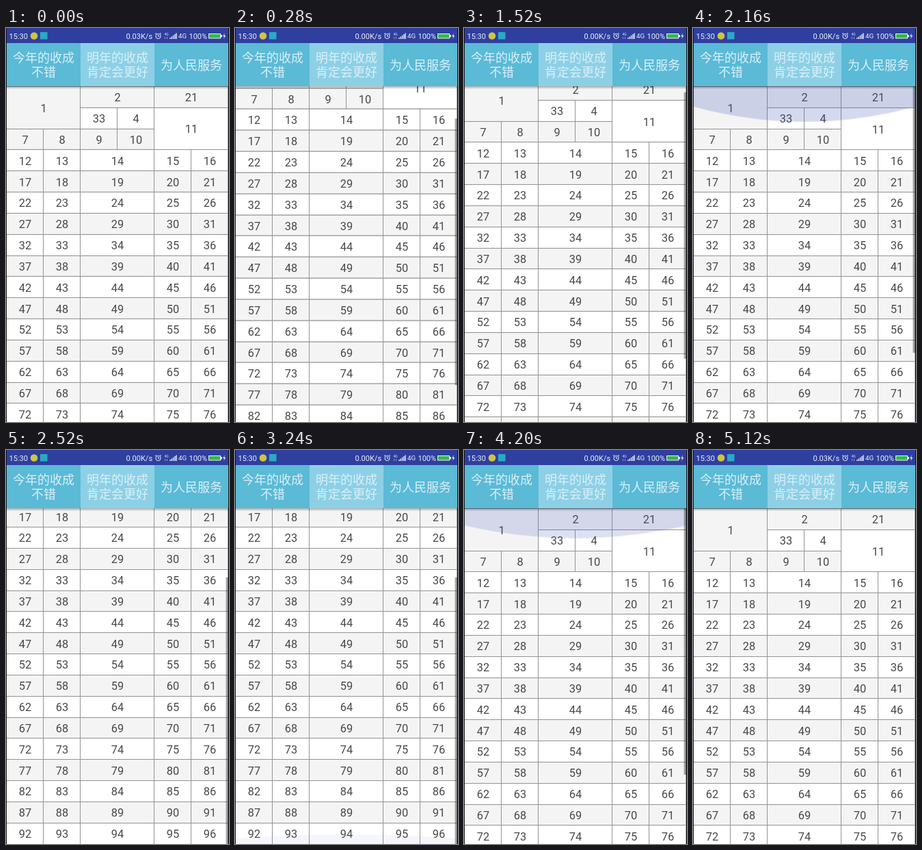
Animation of 326 by 575 pixels, one loop 5.16 s. Source, as an HTML page:

```html
<!DOCTYPE html>
<html lang="zh">
<head>
<meta charset="utf-8">
<title>Scrolling table</title>
<style>
@property --scroll { syntax: "<number>"; inherits: true; initial-value: 0; }
@property --grow { syntax: "<number>"; inherits: true; initial-value: 0; }

html, body { margin: 0; width: 100%; height: 100%; overflow: hidden; background: #fff; }
svg { display: block; width: 326px; height: 575px; font-family: Roboto, "Noto Sans", sans-serif; }

.list { animation: scroll 5160ms linear infinite; }
.rows { transform: translateY(calc(var(--scroll) * -1px)); }
.rows rect { stroke: #939393; }
.rows text { font-size: 16.4px; fill: #484848; text-anchor: middle; }
.thumb { fill: #000; transform: translateY(calc(var(--scroll) * .794px)); animation: thumb 5160ms linear infinite; }

.glow { fill: #3f51b5; opacity: 0; }
.top { transform: translate(163px, 85px) scale(1, var(--grow)); animation: top-glow 5160ms linear infinite; }
.bottom { transform: translate(163px, 575px) scale(1, calc(var(--grow) * -1)); animation: bottom-glow 5160ms linear infinite; }

.head text { font: 500 18px "Noto Sans CJK SC", "Noto Sans CJK", "Noto Sans CJK JP", sans-serif; fill: #d9f0f8; text-anchor: middle; }
.status text { font-size: 11px; fill: #eceefa; }
.busy { animation: busy 5160ms step-end infinite; }
.idle { animation: idle 5160ms step-end infinite; }

@keyframes scroll {
  0% { --scroll: 0; }
  .78% { --scroll: 3; }
  5.43% { --scroll: 59; animation-timing-function: ease-out; }
  10.08%, 23.1% { --scroll: 127; }
  24.03% { --scroll: 118; }
  27% { --scroll: 56; animation-timing-function: ease-out; }
  31% { --scroll: 0; }
  42.64% { --scroll: 0; animation-timing-function: cubic-bezier(.35, .1, .5, 1); }
  48.7%, 65.2% { --scroll: 127; }
  68.22% { --scroll: 50; animation-timing-function: ease-out; }
  73%, 100% { --scroll: 0; }
}
@keyframes thumb {
  0% { opacity: 0; }
  .78%, 88.5% { opacity: .35; }
  96.5%, 100% { opacity: 0; }
}
@keyframes bottom-glow {
  0%, 10% { opacity: 0; --grow: 0; }
  15% { opacity: .22; --grow: .85; }
  20% { opacity: .2; --grow: .8; }
  24.03% { opacity: .11; --grow: .6; }
  27.2%, 48.9% { opacity: 0; --grow: 0; }
  54% { opacity: .22; --grow: .85; }
  59% { opacity: .17; --grow: .7; }
  64.5%, 100% { opacity: 0; --grow: 0; }
}
@keyframes top-glow {
  0%, 30.5% { opacity: 0; --grow: 0; }
  36% { opacity: .22; --grow: .75; }
  41.86% { opacity: .22; --grow: .8; }
  46.5%, 72.8% { opacity: 0; --grow: 0; }
  77.5% { opacity: .22; --grow: .8; }
  82% { opacity: .17; --grow: .65; }
  88%, 100% { opacity: 0; --grow: 0; }
}
@keyframes busy {
  0% { opacity: 1; }
  3.9% { opacity: 0; }
  98.44%, 100% { opacity: 1; }
}
@keyframes idle {
  0% { opacity: 0; }
  3.9% { opacity: 1; }
  98.44%, 100% { opacity: 0; }
}
</style>
</head>
<body>
<svg viewBox="0 0 326 575">
  <defs>
    <clipPath id="view"><rect x="1" y="85" width="324" height="490"/></clipPath>
    <linearGradient id="shade" x2="0" y2="1">
      <stop stop-color="#000" stop-opacity=".3"/>
      <stop offset="1" stop-color="#000" stop-opacity="0"/>
    </linearGradient>
  </defs>

  <rect width="326" height="575" fill="#fff"/>
  <g class="list" clip-path="url(#view)">
    <g class="rows" id="rows"></g>
    <rect class="thumb" x="321.5" y="85" width="3.5" height="389"/>
    <circle class="glow top" cy="-424" r="489"/>
    <circle class="glow bottom" cy="-424" r="489"/>
  </g>

  <g class="head">
    <rect y="85" width="326" height="4.5" fill="url(#shade)"/>
    <rect y="22" width="326" height="63" fill="#5bbad6"/>
    <rect x="109" y="22" width="108" height="63" fill="#8dd0e6"/>
    <text x="55" y="50">今年的收成</text>
    <text x="55" y="71">不错</text>
    <text x="163" y="50">明年的收成</text>
    <text x="163" y="71">肯定会更好</text>
    <text x="271" y="60.5">为人民服务</text>
  </g>

  <g class="status">
    <rect width="326" height="22" fill="#2f3f9f"/>
    <text x="4.5" y="16">15:30</text>
    <circle cx="41" cy="11.5" r="5.3" fill="#cfc443"/>
    <rect x="50" y="6" width="10.5" height="10.5" fill="#2ba9c4"/>
    <text class="busy" x="175.5" y="16">0.03K/s</text>
    <text class="idle" x="175.5" y="16">0.00K/s</text>
    <g fill="none" stroke="#eceefa">
      <circle cx="222.5" cy="12" r="3.6"/>
      <path d="M222.5 9.8v2.4h1.8M218 9l2-1.8M227 9l-2-1.8"/>
    </g>
    <text x="231.5" y="11" style="font-size:5px">4G</text>
    <path d="M232.5 13v3M235.5 13v3" stroke="#aab2dc" stroke-width=".8"/>
    <path d="M240 16v-2M242.3 16v-3.5M244.6 16v-5.2M246.9 16v-7M249 16v-8.5" stroke="#eceefa" stroke-width="1.4"/>
    <text x="252" y="15" style="font-size:9.7px">4G</text>
    <text x="267.5" y="16">100%</text>
    <rect x="296.5" y="8.5" width="17" height="6.5" fill="#35b84a" stroke="#eceefa"/>
    <rect x="314" y="10" width="1.8" height="3.5" fill="#eceefa"/>
    <path d="M319.7 7.5l-2.6 4.7h2l-.9 3.8 3-5h-2z" fill="#eceefa"/>
  </g>

  <path d="M.5 0v575M325.5 0v575" stroke="#111"/>
</svg>
<script>
const rows = document.getElementById("rows");
const PITCH = 30.83, TOP = 85;
const edges = [1, 55, 109, 217, 271, 325];
const lineY = k => Math.round(TOP + PITCH * k);

function add(tag, attrs, label) {
  const el = document.createElementNS("http://www.w3.org/2000/svg", tag);
  for (const name in attrs) el.setAttribute(name, attrs[name]);
  if (label !== undefined) el.textContent = label;
  rows.append(el);
}

function cell(label, left, right, row, span = 1) {
  const y = lineY(row);
  add("rect", {
    x: left - .5, y: y + .5, width: right - left, height: lineY(row + span) - y,
    fill: row % 2 ? "#fff" : "#f4f4f4"
  });
  add("text", { x: (left + right) / 2, y: TOP + PITCH * (row + span / 2) + 6.9 }, label);
}

// Merged heading cells
cell(1, 1, 109, 0, 2);
cell(2, 109, 217, 0);
cell(21, 217, 325, 0);
cell(33, 109, 163, 1);
cell(4, 163, 217, 1);
cell(11, 217, 325, 1, 2);
[1, 55, 109, 163].forEach((x, i) => cell(7 + i, x, x + 54, 2));

for (let row = 3; row < 20; row++)
  for (let col = 0; col < 5; col++)
    cell(12 + 5 * (row - 3) + col, edges[col], edges[col + 1], row);
</script>
</body>
</html>
```
